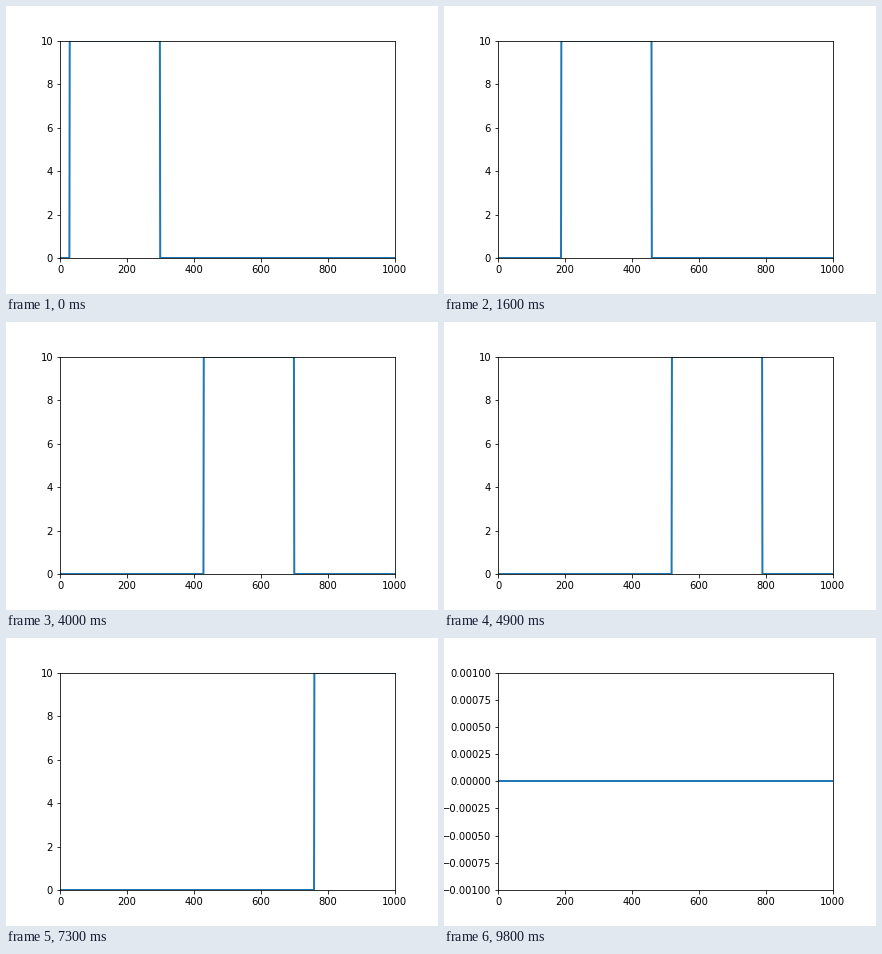
These frames come from a looping animation (432 px wide and 288 px high, 10000 ms). A matplotlib script:

```python
import numpy as np
import matplotlib.pyplot as plt
from matplotlib.animation import FuncAnimation

FRAMES = 100
STEP = 10             # samples travelled per frame
START, END = 29, 299  # pulse bounds in samples at time zero
HEIGHT = 10

x = np.linspace(0, 1000, 1000)
samples = np.arange(x.size)

fig, ax = plt.subplots(figsize=(6, 4), dpi=72)
fig.subplots_adjust(left=0.125, right=0.9, bottom=0.125, top=0.88)
ax.set_xlim(0, 1000)
line, = ax.plot([], [], lw=2, color="#1f77b4")


def pulse(shift):
    inside = (samples >= START + shift) & (samples < END + shift)
    return np.where(inside, HEIGHT, 0.0)


def update(i):
    y = pulse(STEP * i)
    line.set_data(x, y)
    # The axis follows the data; a flat signal gets a tiny symmetric range.
    if y.any():
        ax.set_ylim(0, HEIGHT)
    else:
        ax.set_ylim(-0.001, 0.001)
    return line,


anim = FuncAnimation(fig, update, frames=FRAMES, interval=100,
                     repeat=True, repeat_delay=0, blit=False)
plt.show()
```
